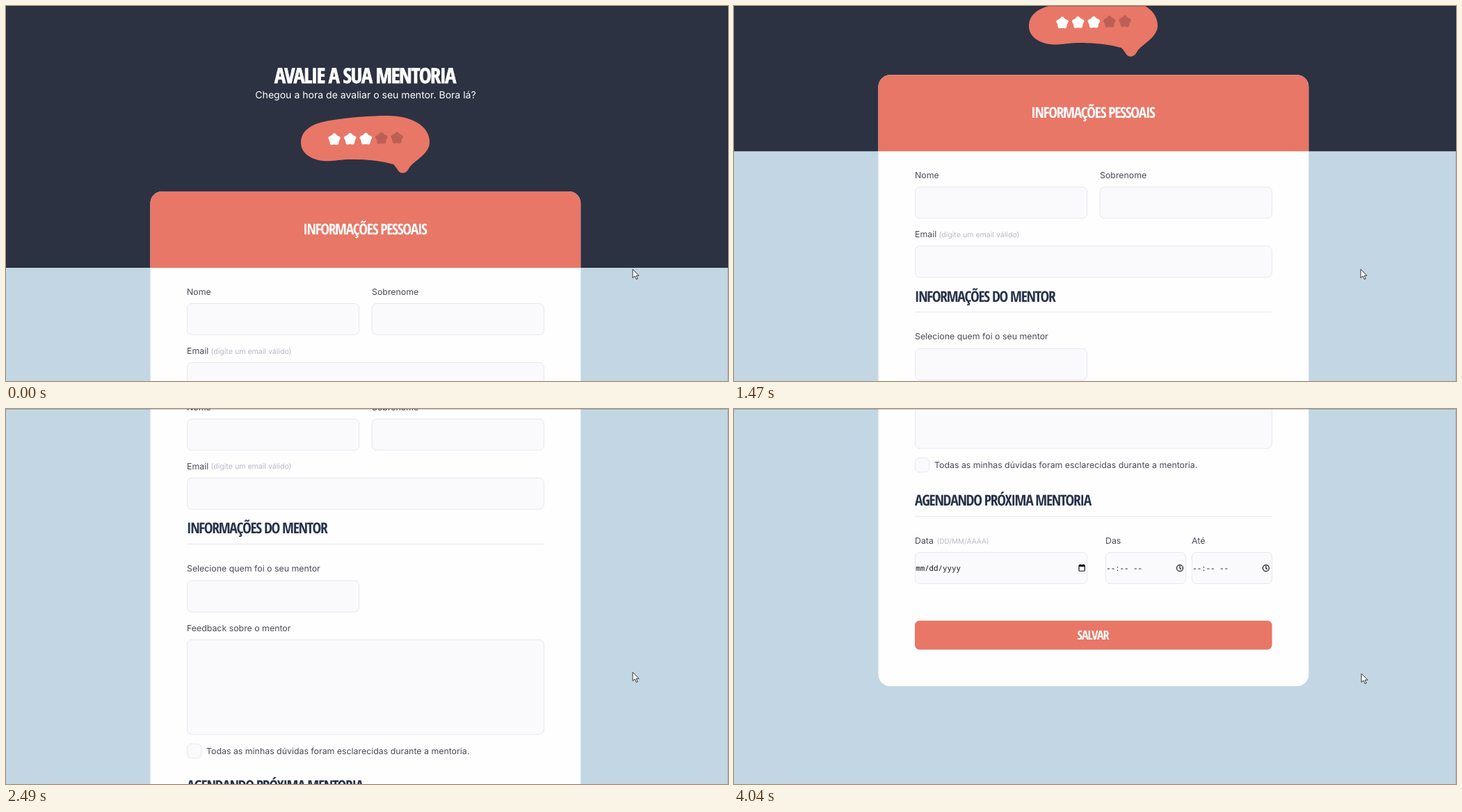
These frames come from a looping animation (1038x540 px, 4630 ms). An HTML page:

```html
<!DOCTYPE html>
<html lang="pt-BR">
<head>
<meta charset="utf-8">
<title>Avalie a sua mentoria</title>
<style>
  html, body { margin: 0; width: 100%; height: 100%; overflow: hidden; background: #c3d6e4; }
  svg { display: block; width: 1038px; height: 540px; }
  text { font: 12.35px Inter, sans-serif; fill: #4e4958; text-rendering: geometricPrecision; white-space: pre; }
  .hint { font-size: 10.6px; fill: #b9b8c9; }
  .intro { font-size: 14.05px; fill: #fff; }
  .mono { font: 10.8px "Noto Sans Mono", "DejaVu Sans Mono", monospace; fill: #111; }
  .title, .head, .save {
    font-family: "Open Sans Condensed", "Liberation Sans Narrow", "Roboto Condensed", "Open Sans", sans-serif;
    font-weight: 700; font-stretch: 75%;
  }
  .title { font-size: 30px; letter-spacing: -1.4px; fill: #fff; stroke: #fff; stroke-width: .8px; }
  .head { font-size: 21.5px; letter-spacing: -1.3px; fill: #27324a; }
  .save { font-size: 18px; letter-spacing: -1.1px; }
  .wide .title { font-size: 22.5px; letter-spacing: -1.7px; }
  .wide .head { font-size: 16.5px; letter-spacing: -1.7px; }
  .wide .save { font-size: 14.5px; letter-spacing: -1.3px; }
  .light { fill: #fff; }
  .mid { text-anchor: middle; }
  .field { fill: #fafafc; stroke: #e6e7f0; stroke-width: 1; }
  .rule { stroke: #e6e7f0; stroke-width: 1; }
  .icon { fill: none; stroke: #111; stroke-width: 1.2; }
</style>
</head>
<body>
<svg viewBox="0 0 1038 540" xmlns="http://www.w3.org/2000/svg">
  <defs>
    <path id="star" stroke-width="5" stroke-linejoin="round"
      d="M0-6.5 2.7-3.7 6.2-2 4.4 1.4 3.8 5.3 0 4.6-3.8 5.3-4.4 1.4-6.2-2-2.7-3.7Z"/>
    <g id="clock" class="icon"><circle r="4.5"/><path d="M0-3V.3L2 1.8"/></g>
  </defs>

  <rect width="1038" height="540" fill="#c3d6e4"/>

  <g id="page">
    <rect y="-2" width="1038" height="379" fill="#2c3242"/>
    <text class="title mid" id="title" x="516" y="110.5">AVALIE A SUA MENTORIA</text>
    <text class="intro mid" x="517" y="133">Chegou a hora de avaliar o seu mentor. Bora lá?</text>

    <path fill="#e87767" d="M424 197C424 178 441 169 465 165C495 160 525 158 549 158
      C582 158 609 172 609 196C609 212 590 221 581 231C578 236 576 240.5 570 240.5
      C564 240.5 563 234 557 228C535 222 510 220.5 490 221C475 222 466 224 456 223
      C437 221 424 211 424 197Z"/>
    <g fill="#fff" stroke="#fff">
      <use href="#star" x="472" y="192.2"/>
      <use href="#star" x="494.7" y="191.8"/>
      <use href="#star" x="517.3" y="191.6"/>
    </g>
    <g fill="#bd5f54" stroke="#bd5f54">
      <use href="#star" x="539.8" y="190.8"/>
      <use href="#star" x="562" y="190.3"/>
    </g>

    <rect x="207.5" y="267" width="618.7" height="958" rx="17" fill="#fefefe"/>
    <path fill="#e87767" d="M207.5 377V284a17 17 0 0 1 17-17H809.2a17 17 0 0 1 17 17V377Z"/>
    <text class="head light mid" x="516" y="329">INFORMAÇÕES PESSOAIS</text>

    <text x="260" y="416">Nome</text>
    <text x="526" y="416">Sobrenome</text>
    <rect class="field" x="260.5" y="428.5" width="247" height="45" rx="6.5"/>
    <rect class="field" x="526.3" y="428.5" width="247" height="45" rx="6.5"/>

    <text x="260" y="500.7">Email</text>
    <text class="hint" x="294.5" y="500.5">(digite um email válido)</text>
    <rect class="field" x="260.5" y="513.5" width="512.8" height="45" rx="6.5"/>

    <text class="head" x="260" y="593.5">INFORMAÇÕES DO MENTOR</text>
    <path class="rule" d="M260 608.6H773.5"/>
    <text x="260" y="648.3">Selecione quem foi o seu mentor</text>
    <rect class="field" x="260.5" y="661.3" width="247" height="45" rx="6.5"/>

    <text x="260" y="733.7">Feedback sobre o mentor</text>
    <rect class="field" x="260.5" y="746.3" width="512.8" height="136.3" rx="6.5"/>

    <rect class="field" x="260.5" y="896.3" width="20.4" height="20.4" rx="6"/>
    <text x="288" y="910.8">Todas as minhas dúvidas foram esclarecidas durante a mentoria.</text>

    <text class="head" x="260" y="964.5">AGENDANDO PRÓXIMA MENTORIA</text>
    <path class="rule" d="M260 980.2H773.5"/>

    <text x="260" y="1019.6">Data</text>
    <text class="hint" x="291.5" y="1019.4" style="font-size:10.1px">(DD/MM/AAAA)</text>
    <text x="534" y="1019.6">Das</text>
    <text x="658" y="1019.6">Até</text>
    <rect class="field" x="260.5" y="1032.3" width="247" height="45" rx="6.5"/>
    <rect class="field" x="534.3" y="1032.3" width="115" height="45" rx="6.5"/>
    <rect class="field" x="658.3" y="1032.3" width="115" height="45" rx="6.5"/>
    <text class="mono" x="261.2" y="1058.6">mm/dd/yyyy</text>
    <text class="mono" x="535.2" y="1058.6">--:-- --</text>
    <text class="mono" x="659.2" y="1058.6">--:-- --</text>
    <g class="icon">
      <rect x="496" y="1050.6" width="8.2" height="8.4" rx=".8"/>
      <path d="M496 1051.7H504.2" stroke-width="2.4"/>
      <path d="M498 1049V1051M502.2 1049V1051"/>
    </g>
    <use href="#clock" x="641" y="1054.8"/>
    <use href="#clock" x="764.8" y="1054.8"/>

    <rect x="260" y="1130.6" width="513.5" height="41.6" rx="6.6" fill="#e87767"/>
    <text class="save light mid" x="516" y="1157.5">SALVAR</text>
  </g>

  <path d="M0 .5H1038" stroke="#000" stroke-opacity=".2"/>
  <path d="M1037.5 1V540" stroke="#000" stroke-opacity=".12"/>
  <path id="cursor" fill="#fff" stroke="#222" stroke-width=".9" stroke-linejoin="round"
    d="M0 0V12.5L3 9.8 5.2 14.6 7.2 13.7 5 9.2H9Z"/>
</svg>

<script>
  const LOOP = 4630;
  const TICK = 82.66;

  // [time in ms, scroll in wheel ticks]
  const scrollSteps = [
    [0, 0],
    [460, .03], [530, .38], [600, .83], [670, 1.03], [740, 1.42], [810, 1.84], [880, 2],
    [1470, 2.03], [1540, 2.4], [1610, 2.85], [1680, 3], [1810, 3.25], [1880, 3.75], [1950, 4],
    [2020, 4.3], [2090, 4.8], [2160, 5],
    [2490, 5.01], [2560, 5.35], [2630, 5.8], [2700, 6], [2770, 6.25],
    [2840, 6.7], [2920, 7], [2990, 7.28], [3040, 7.72], [3110, 8],
    [3570, 8.03], [3640, 8.385], [3710, 8.83], [3780, 9.03],
    [3850, 9.4], [3920, 9.8], [3980, 9.97], [4040, 9.99]
  ];

  // [time in ms, x, y]
  const cursorSteps = [
    [0, 901, 379], [2770, 901, 381], [2920, 901, 383],
    [3240, 901, 382], [3380, 901, 381], [3920, 902, 381]
  ];

  const page = document.getElementById('page');
  const cursor = document.getElementById('cursor');
  const stepAt = (steps, time) => steps.findLast(([start]) => start <= time);
  const move = (el, x, y) => el.setAttribute('transform', `translate(${x} ${y})`);

  // Smaller headings where no condensed face is installed
  if (document.getElementById('title').getComputedTextLength() > 295) {
    document.body.classList.add('wide');
  }

  const startTime = performance.now();

  function draw() {
    const time = (performance.now() - startTime) % LOOP;
    const [, ticks] = stepAt(scrollSteps, time);
    const [, x, y] = stepAt(cursorSteps, time);
    move(page, 0, -ticks * TICK);
    move(cursor, x, y);
    requestAnimationFrame(draw);
  }
  draw();
</script>
</body>
</html>
```
